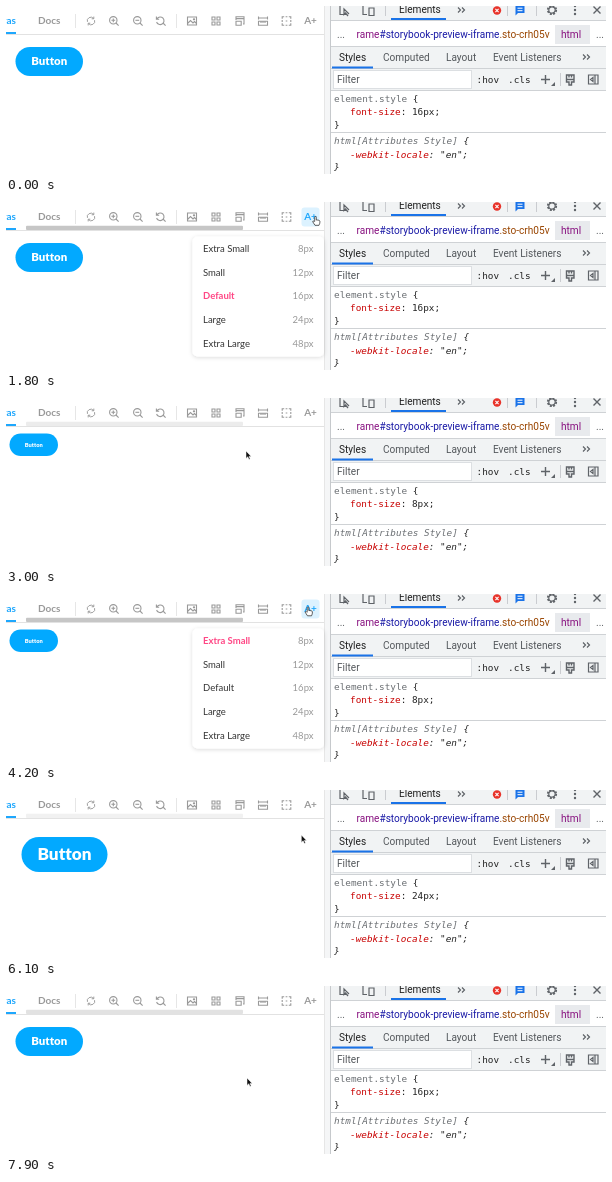
An HTML page that plays this animation: 600x168 px, repeating every 8000 ms.

```html
<!DOCTYPE html>
<html lang="en">
<head>
<meta charset="utf-8">
<title>Font size toolbar</title>
<style>
  html, body { margin: 0; width: 100%; height: 100%; overflow: hidden; background: #fff; }
  svg { display: block; }
  text { white-space: pre; }
  .lato { font-family: Lato, sans-serif; font-variant-ligatures: none; }
  .ui { font: 10.1px Roboto, sans-serif; fill: #54585c; }
  .mono { font: 9.35px "DejaVu Sans Mono", monospace; fill: #222; }
  .prop { fill: #c80000; }
  .sel { fill: #6b6f73; }
  .it { font-style: italic; }
  .icon { fill: none; stroke: #999; stroke-width: 1.1; color: #999; }
  .icon.on { stroke: #1ea7fd; color: #1ea7fd; }
  .icon text { fill: currentColor; stroke: none; font-size: 10px; font-weight: 700; }
  .tool { fill: none; stroke: #5f6368; stroke-width: 1.2; }
  .row text { font-size: 9.5px; fill: #333; }
  .row .px { fill: #999; text-anchor: end; }
  .row.sel-row .name { fill: #ff4785; font-weight: 700; }
</style>
</head>
<body>
<svg width="600" height="168" viewBox="0 0 600 168">
  <defs>
    <filter id="shadow" x="-10%" y="-10%" width="120%" height="125%">
      <feDropShadow dx="0" dy="1" stdDeviation="2.2" flood-color="#000" flood-opacity=".15"/>
    </filter>
    <g id="lens"><circle cx="-.7" cy="-.7" r="3.7"/><path d="M2 2L4.6 4.6"/></g>
  </defs>

  <!-- preview pane -->
  <rect width="600" height="168" fill="#fff"/>
  <g class="lato" font-weight="700">
    <text x="10" y="18.3" font-size="10" fill="#1ea7fd" text-anchor="end">Canvas</text>
    <text x="32" y="18.3" font-size="10" fill="#999">Docs</text>
  </g>
  <path d="M69.5 8V22M170.5 8V22" stroke="#e6e6e6"/>
  <rect y="28" width="318" height="1" fill="#e2e2e2"/>
  <rect id="bar" x="20" y="23.7" width="217" height="4.3" rx="1" fill="#c6c6c6"/>
  <rect y="26" width="10" height="2" fill="#1ea7fd"/>
  <rect id="glow" y="5.5" width="18" height="19" rx="3" fill="#dcf2ff"/>
  <g id="icons">
    <g class="icon" transform="translate(85 15) scale(.85)"><path d="M-4.2 1A4.2 4.2 0 0 1 3-3M4.2-1A4.2 4.2 0 0 1-3 3M3.3-5.2V-2.6H.8M-3.3 5.2V2.6H-.8"/></g>
    <g class="icon" transform="translate(108 15)"><use href="#lens"/><path d="M-2.6-.7H1.2M-.7-2.6V1.2"/></g>
    <g class="icon" transform="translate(132 15)"><use href="#lens"/><path d="M-2.6-.7H1.2"/></g>
    <g class="icon" transform="translate(155 15)"><path d="M-3.9-2.4A3.8 3.8 0 1 1-4.4 1M-4.6-4.6V-1.8H-1.8M2 2L4.6 4.6"/></g>
    <g class="icon" transform="translate(186 15)"><path d="M-4.5-4H4.5V4H-4.5ZM-4.5 2.5L-1.5-.5L1 2L2.5.5L4.5 2.5"/><circle cx="2" cy="-1.7" r=".6"/></g>
    <g class="icon" transform="translate(210 15)"><path d="M-4-4H-1V-1H-4ZM1-4H4V-1H1ZM-4 1H-1V4H-4ZM1 1H4V4H1Z"/></g>
    <g class="icon" transform="translate(234 15)"><path d="M-4-1V-4.2H4V3H3M-4-2.4H4M-4 .3H1.2V4.3H-4Z"/></g>
    <g class="icon" transform="translate(257 15)"><path d="M-4.5-4.5V-1.5M4.5-4.5V-1.5M-4.5-3H4.5M-4.5 .3H4.5V4.3H-4.5ZM-2 .3V2M0 .3V2M2 .3V2"/></g>
    <g class="icon" transform="translate(280.5 15)"><path d="M-4.3-2.3V-4.3H-2.3M2.3-4.3H4.3V-2.3M4.3 2.3V4.3H2.3M-2.3 4.3H-4.3V2.3M-.9-4.3H.9M-.9 4.3H.9M-4.3-.9V.9M4.3-.9V.9M-.8 0H.8"/></g>
    <g class="icon lato" transform="translate(304.5 15)"><text y="3.3" text-anchor="middle">A+</text></g>
  </g>
  <g class="lato" font-weight="900" text-anchor="middle">
    <rect id="pill" fill="#02a9ff"/>
    <text id="label" fill="#fff">Button</text>
  </g>

  <!-- inspector -->
  <rect x="318" width="7" height="168" fill="#f5f6f7"/>
  <rect x="318" width="1" height="168" fill="#e6e6e6"/>
  <rect x="324.5" width="276" height="14" fill="#f1f3f4"/>
  <rect x="325" y="40" width="275" height="22" fill="#f1f3f4"/>
  <rect x="325" y="63" width="275" height="21" fill="#f1f3f4"/>
  <rect x="327.5" y="64.5" width="138" height="18" fill="#fff" stroke="#dcdfe2"/>
  <path d="M325 14.5H600M325 40.5H600M325 62.5H600M325 84.5H600M325 126.5H600" stroke="#cfd2d5"/>
  <path d="M324.5 0V168" stroke="#c6c9cc"/>
  <path d="M385 13H440M326 61.5H367" stroke="#1a73e8" stroke-width="2"/>
  <path d="M379.5 0V10M501.5 0V10M530.5 0V10M554.5 67V80" stroke="#caccd0"/>
  <g class="tool">
    <path d="M341 8.5H334V0M343 8L338 3V8.5L339.5 7L342 10M357 0V8.5H361M363 2H368V9.5H363Z"/>
    <path d="M452 1.5L454.5 4L452 6.5M456 1.5L458.5 4L456 6.5M577 48.5L579.5 51L577 53.5M581 48.5L583.5 51L581 53.5"/>
    <circle cx="546" cy="4" r="4.2" stroke-width="1.8" stroke-dasharray="2 1.3"/>
    <circle cx="546" cy="4" r="3.2"/>
    <path d="M587.5 .5L594.5 7.5M594.5 .5L587.5 7.5" stroke-width="1.4"/>
    <path d="M535 73.5H544M539.5 69V78" stroke-width="1.4"/>
    <path d="M560.5 73.5V69H568V73.5ZM560.5 73.5V76H563V79H565.5V76H568V73.5M563 69V71.5M565.5 69V71.5" stroke-width="1.4"/>
    <path d="M582.5 69H592V78H582.5ZM589 69V78M587 71.5L584.5 73.5L587 75.5Z"/>
  </g>
  <path d="M545 80H549V76Z" fill="#5f6368"/>
  <g fill="#5f6368"><circle cx="569" cy="0" r="1.2"/><circle cx="569" cy="4" r="1.2"/><circle cx="569" cy="8" r="1.2"/></g>
  <circle cx="491" cy="4.5" r="4.2" fill="#e8332a"/>
  <path d="M489.4 2.9L492.6 6.1M492.6 2.9L489.4 6.1" stroke="#fff" stroke-width="1.1"/>
  <path d="M509.5 0H518.5V7H512L509.5 9.5Z" fill="#1a73e8"/>
  <path d="M511.5 2.2H516.5M511.5 4.7H516.5" stroke="#fff"/>
  <rect x="549" y="19" width="35" height="19" fill="#e8eaed"/>
  <g class="ui">
    <text x="393" y="6.5" fill="#222">Elements</text>
    <text x="331" y="31.7">...</text>
    <text x="350.5" y="31.7"><tspan fill="#881280">rame</tspan><tspan fill="#1a1aa6">#storybook-preview-iframe</tspan><tspan fill="#994500">.sto-crh05v</tspan></text>
    <text x="555" y="31.7" fill="#881280">html</text>
    <text x="590" y="31.7">...</text>
    <text x="333" y="54.5" fill="#222">Styles</text>
    <text x="377" y="54.5">Computed</text>
    <text x="440" y="54.5">Layout</text>
    <text x="487" y="54.5">Event Listeners</text>
    <text x="331" y="77">Filter</text>
  </g>
  <g class="mono">
    <text x="470.5" y="76.5">:hov</text>
    <text x="502" y="76.5">.cls</text>
    <text x="328" y="95.5"><tspan class="sel">element.style</tspan> {</text>
    <text x="344" y="109"><tspan class="prop">font-size</tspan>: <tspan id="size"></tspan>;</text>
    <text x="328" y="121.5">}</text>
    <g class="it">
      <text x="328" y="137.5"><tspan class="sel">html[Attributes Style]</tspan> {</text>
      <text x="344" y="151.5"><tspan class="prop">-webkit-locale</tspan>: "en";</text>
      <text x="328" y="163.5">}</text>
    </g>
  </g>

  <!-- size menu -->
  <g id="menu" class="lato">
    <rect x="186.5" y="34.5" width="131.5" height="120" rx="5" fill="#fff" filter="url(#shadow)"/>
  </g>

  <path id="arrow" d="M0 0V7.4L1.8 5.8L3 8.6L4.2 8L3 5.4H5.2Z" fill="#111" stroke="#fff" stroke-width=".5"/>
  <g id="hand">
    <path transform="scale(.88)" d="M-.9 5.6V.8A.9.9 0 0 1 .9.8V4C3 4 5 4.2 5 5.6C5 8 4.6 8.4 4 10H-.6C-1.4 8.4-2.8 7-3.2 5.8C-3 4.8-1.8 5-.9 6.2" fill="#fff" stroke="#333" stroke-width=".9" stroke-linejoin="round"/>
  </g>
</svg>
<script>
const LOOP = 8000, STEP = 100;
const $ = id => document.getElementById(id);
const set = (el, attrs) => { for (const k in attrs) el.setAttribute(k, attrs[k]); };
const show = (el, on) => el.style.display = on ? '' : 'none';

const SIZES = [['Extra Small', 8], ['Small', 12], ['Default', 16], ['Large', 24], ['Extra Large', 48]];
const ROW_TOP = 35, ROW_H = 23.75;
const ICON_X = [85, 108, 132, 155, 186, 210, 234, 257, 280.5, 304.5];

// Button geometry per font size: x, y, width, height
const PILL = { 8: [3.5, 35.5, 48.5, 22.5], 16: [9.5, 41, 67.5, 29], 24: [15.5, 47, 86, 35] };

// time, x, y of the pointer tip
const POINTER = [
  [500, 311, 111], [900, 301, 62], [1300, 308, 16], [1600, 309.5, 14.5], [1900, 309.5, 14.5],
  [2300, 240, 52], [2800, 240, 52], [2900, 240, 53], [3200, 240, 53], [3500, 251, 83],
  [4000, 302, 13], [4200, 302, 13], [4600, 260, 119], [5400, 260, 119], [5700, 268, 105],
  [6300, 309, 15], [6500, 309, 15], [6900, 280, 23], [7200, 241, 92], [8000, 241, 92]
];
// time, opacity of the toolbar scrollbar
const BAR = [
  [1000, 0], [1300, 1], [2800, 1], [3100, 0], [3700, 0], [4000, 1],
  [4900, 1], [5200, 0], [6000, 0], [6400, 1], [7800, 1], [8000, 0]
];
const MENU = [[1800, 2500], [4200, 5000], [6400, 7500]];
const FONT = [[0, 16], [2600, 8], [5100, 24], [7600, 16]];

function track(keys, t) {
  if (t <= keys[0][0]) return keys[0].slice(1);
  const i = keys.findIndex(k => k[0] >= t);
  if (i < 0) return keys[keys.length - 1].slice(1);
  const a = keys[i - 1], b = keys[i], p = (t - a[0]) / (b[0] - a[0]);
  return a.slice(1).map((v, n) => v + (b[n + 1] - v) * p);
}

const rows = SIZES.map(([name, px], i) => {
  const g = document.createElementNS('http://www.w3.org/2000/svg', 'g');
  const top = ROW_TOP + i * ROW_H, base = top + 14.8;
  g.setAttribute('class', 'row');
  g.innerHTML = `<rect x="186.5" y="${top}" width="131.5" height="${ROW_H}" fill="#f3f7fa"/>
    <text class="name" x="197" y="${base}">${name}</text>
    <text class="px" x="307.5" y="${base}">${px}px</text>`;
  $('menu').append(g);
  return g;
});
const icons = [...$('icons').children];

function draw(t) {
  const [x, y] = track(POINTER, t);
  const open = MENU.some(([a, b]) => t >= a && t < b);
  const size = FONT.filter(k => k[0] <= t).pop()[1];
  const visible = t >= POINTER[0][0];
  const icon = visible && y < 28 ? ICON_X.findIndex(c => Math.abs(x - c) < 11.5) : -1;
  const row = open && y >= ROW_TOP && x > 186 ? Math.floor((y - ROW_TOP) / ROW_H) : -1;

  const [px, py, w, h] = PILL[size];
  set($('pill'), { x: px, y: py, width: w, height: h, rx: h / 2 });
  set($('label'), { x: px + w / 2, y: py + h / 2 + size * .24, 'font-size': size * .715 });
  $('size').textContent = size + 'px';

  icons.forEach((el, i) => el.classList.toggle('on', i === icon));
  show($('glow'), icon >= 0);
  if (icon >= 0) set($('glow'), { x: ICON_X[icon] - 9 });
  $('bar').style.opacity = track(BAR, t)[0];

  show($('menu'), open);
  rows.forEach((el, i) => {
    el.classList.toggle('sel-row', SIZES[i][1] === size);
    show(el.firstElementChild, i === row);
  });

  const pointing = icon >= 0 || row >= 0;
  show($('hand'), visible && pointing);
  show($('arrow'), visible && !pointing);
  set($(pointing ? 'hand' : 'arrow'), { transform: `translate(${x} ${y})` });
}

const start = performance.now();
function tick() {
  const t = (performance.now() - start) % LOOP;
  draw(Math.floor(t / STEP) * STEP);
  requestAnimationFrame(tick);
}
tick();
</script>
</body>
</html>
```
